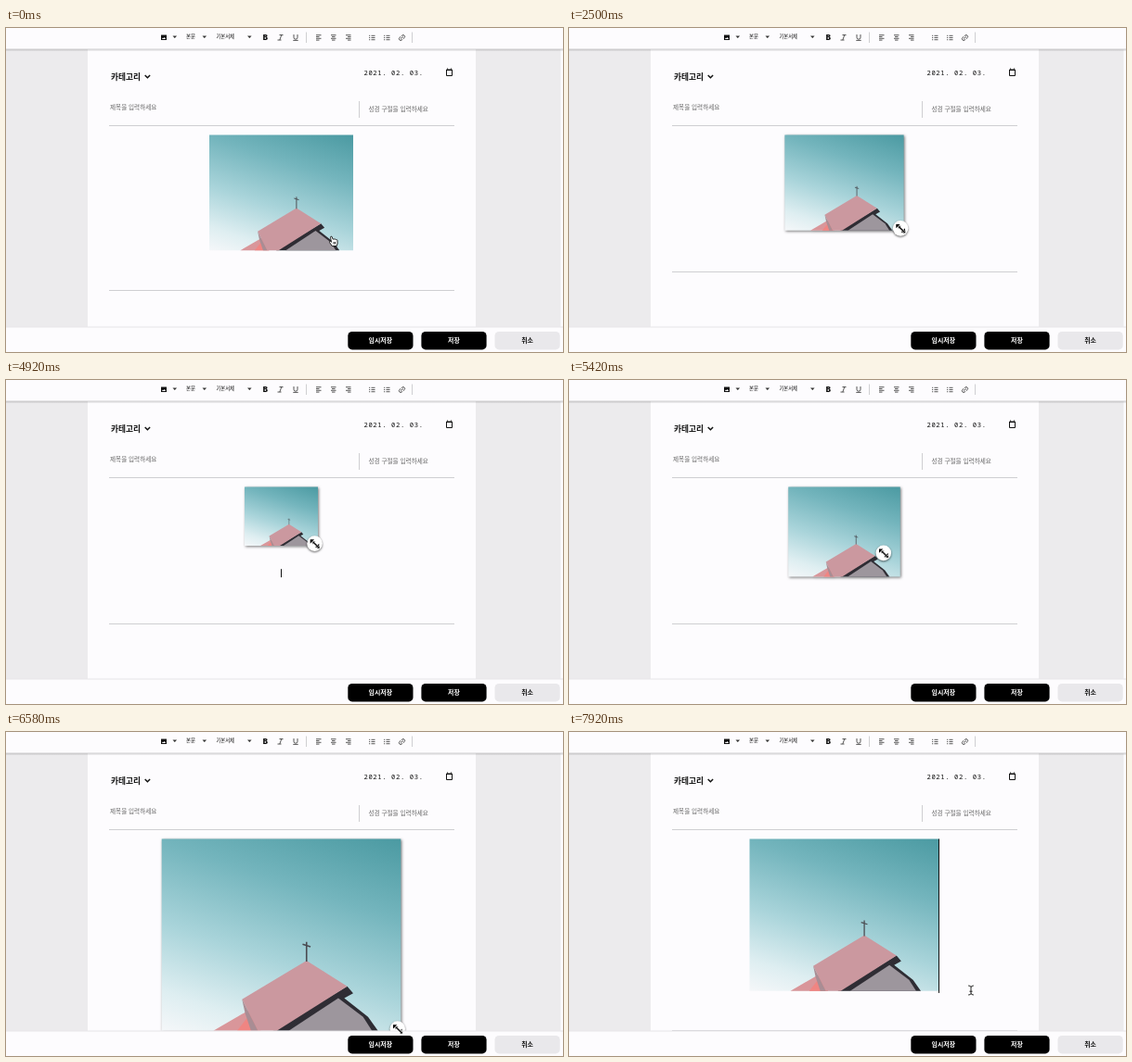
Write an HTML page that moves like this. It is 600x350 px and loops after 8 s.

```html
<!DOCTYPE html>
<html lang="ko">
<head>
<meta charset="utf-8">
<title>Image resize in an editor</title>
<style>
html, body { margin: 0; width: 100%; height: 100%; overflow: hidden; background: #fdfcfe; }
svg { display: block; width: 600px; height: 350px; }
text { font-family: "Noto Sans CJK KR", "Noto Sans CJK", "Noto Sans CJK JP", sans-serif; fill: #111; }
.hint { font-size: 6.6px; font-weight: 500; fill: #666; }
.date { font: 500 7.2px "Noto Sans Mono", monospace; letter-spacing: .62px; }
.btn { font-size: 6.9px; font-weight: 700; text-anchor: middle; }
.rule { stroke: #cfcfd2; fill: none; }
.icon { stroke: #444; stroke-width: .9; fill: none; }
.picked { filter: drop-shadow(1px 1.2px 1.6px #0008); }
#handle circle { filter: drop-shadow(.5px 1px 1.3px #0009); }
</style>
</head>
<body>
<svg viewBox="0 0 600 350">
  <defs>
    <linearGradient id="sky" gradientUnits="userSpaceOnUse" x1="241" y1="0" x2="160" y2="247">
      <stop offset="0" stop-color="#4b9aa2"/>
      <stop offset=".3" stop-color="#74b5bd"/>
      <stop offset=".6" stop-color="#a9d4da"/>
      <stop offset=".85" stop-color="#deeef1"/>
      <stop offset="1" stop-color="#f5f7f9"/>
    </linearGradient>
    <linearGradient id="bar" x2="0" y2="1">
      <stop stop-color="#0003"/><stop offset="1" stop-color="#0000"/>
    </linearGradient>
    <path id="ibeam" d="M-2.5-5Q0-5 0-3.500V3.500Q0 5-2.500 5M2.500-5Q0-5 0-3.500M2.500 5Q0 5 0 3.500M-1.200 1.200h2.400"/>
    <path id="arrow" d="M-4.800-4.300h4.300l-1.300 1.300L0-1.200V1L-3.200-1.600l-1.600 1.600z"/>
  </defs>

  <rect width="600" height="350" fill="#fdfcfe"/>
  <path d="M0 23H88V323H0zM506 23H597.5V323H506z" fill="#ecebed"/>

  <text x="113" y="55.8" font-size="8.7" font-weight="600">카테고리</text>
  <path d="M149.700 51l2.700 2.700 2.700-2.700" stroke="#111" stroke-width="1.5" fill="none"/>
  <text class="date" x="385.5" y="51.2">2021. 02. 03.</text>
  <path d="M474.500 45h6v6.500h-6zM474 45.500h7M475.500 43.500v1M479.500 43.500v1" stroke="#111" fill="none"/>
  <text class="hint" x="112" y="87.8">제목을 입력하세요</text>
  <text class="hint" x="390.5" y="90.2">성경 구절을 입력하세요</text>
  <path class="rule" d="M380.500 79V97M111 105.500H483"/>
  <path class="rule" id="rule" d="M111 0H483"/>

  <g id="photo">
    <g id="scene">
      <rect width="241" height="194" fill="url(#sky)"/>
      <path d="M88 173L52 194H100z" fill="#d9969a"/>
      <path d="M90 176L76 194H100z" fill="#f08582"/>
      <path d="M187 149L193 156L184 161L208 180L218 194H112z" fill="#2f2d34"/>
      <path d="M146 123L187 149L116 194H97L81 162z" fill="#cb989f"/>
      <path d="M81 162L97 194H90L84 176z" fill="#a98d94"/>
      <path d="M178 161L203 180L212 194H128z" fill="#9d969d"/>
      <path d="M146 104V124M142 106.500L150 109" stroke="#4a4a50" stroke-width="1.5"/>
    </g>
  </g>
  <path id="caret" stroke="#111"/>
  <g id="handle">
    <circle r="8.3" fill="#fff"/>
    <use href="#arrow"/><use href="#arrow" transform="rotate(180)"/>
  </g>

  <rect width="600" height="23" fill="#fdfcfe"/>
  <rect y="22.5" width="600" height="3" fill="url(#bar)"/>
  <path d="M167 7.500h6v5.500h-6zM168 12h4l-1.400-2-1 1.200-.7-.7z" fill="#111" fill-rule="evenodd"/>
  <path d="M179.500 8.500h4.600l-2.300 2.400zM211.500 8.500h4.600l-2.300 2.400zM260 8.500h4.600l-2.300 2.400z" fill="#333"/>
  <text x="194" y="11.2" font-size="5.5">본문</text>
  <text x="226.5" y="11.2" font-size="5.3">기본서체</text>
  <text x="276.8" y="13" font-size="7.8" font-weight="900" style="font-family:Inter,sans-serif">B</text>
  <path class="icon" d="M294.500 7.500h4M292.500 13h4M296.800 7.500l-2 5.500M310 7v3.200a2 2 0 0 0 4 0V7M309.300 13.400h5.400"/>
  <path class="rule" d="M323.500 4.500V16M437.500 4.500V16"/>
  <path class="icon" id="lines"/>
  <g class="icon" transform="rotate(-40 426.5 10.5)">
    <path d="M426 8.800h-1.300a1.700 1.700 0 0 0 0 3.400h1.300M427 8.800h1.300a1.700 1.700 0 0 1 0 3.400h-1.300M425 10.500h3"/>
  </g>

  <rect y="323" width="600" height="27" fill="#fdfcfe"/>
  <path d="M0 323H600" stroke="#e6e5e8"/>
  <g id="buttons"></g>

  <g id="beam" fill="none" stroke-linecap="round">
    <use href="#ibeam" stroke="#fff" stroke-width="2"/>
    <use href="#ibeam" stroke="#111" stroke-width=".9"/>
  </g>
  <path id="hand" d="M-1.800 5.500L-4.500 1.500q-.5-1.200.8-1.200l1.200 1L-3.500-3.800q.1-1.400 1.400-1L-.8-1.800q1-.8 1.700.1 1-.6 1.600.3 1.300-.3 1.500 1L4 3 3.200 5.500zM0 1v2.500M1.600 1v2.500" fill="#fff" stroke="#111" stroke-width=".9"/>
  <path id="resize" d="M-4-4h3.500L-1.600-2.900 2.900 1.600 4 .5V4H.5L1.600 2.900-2.900-1.600-4-.5z" fill="#111" stroke="#fff" stroke-width=".6"/>
</svg>
<script>
const $ = id => document.getElementById(id);
const LOOP = 8000, STEP = 1000 / 12, MID = 296.5, TOP = 115.5, RATIO = .806;

// Where the pointer turns: [step, x, y].
const stops = [[0, 353, 230], [4, 500, 319], [9, 352, 222], [18, 355, 203],
  [23, 370, 236], [37, 336, 208], [44, 327, 158], [51, 506, 319],
  [56, 333, 172], [73, 422, 308], [95, 433, 279]];

const ease = (s, from, to) => {
  const p = Math.min(1, Math.max(0, (s - from) / (to - from)));
  return p * p * (3 - 2 * p);
};
const during = (s, from, to) => s >= from && s <= to;

// Three drags: smaller, much larger, a little smaller again.
const width = (s, lag = 0) => 155 - 76 * ease(s, 26, 36)
  + 179 * ease(s - lag, 60, 76) - 54 * ease(s, 78.5, 88);

// Summing eased legs gives a path through all the stops.
const path = (s, axis) => stops.reduce((sum, stop, i) => {
  const last = stops[i - 1];
  return last ? sum + (stop[axis] - last[axis]) * ease(s, last[0], stop[0]) : stop[axis];
}, 0);

function place(id, x, y, shown = true) {
  $(id).setAttribute("transform", `translate(${x} ${y})`);
  $(id).style.display = shown ? "" : "none";
}

function draw(now) {
  const s = Math.floor((now % LOOP + 4) / STEP) % 96;
  const w = width(s), grip = width(s, 2.4), x = path(s, 1), y = path(s, 2);
  const left = MID - w / 2, right = MID + w / 2, bottom = TOP + w * RATIO;
  const gripX = MID + grip / 2 - 3.5, gripY = TOP + grip * RATIO - 2.5;
  const picked = during(s, 11, 45) || during(s, 55, 87);
  const onGrip = during(s, 23, 36) || during(s, 57, 71) || during(s, 76, 87);
  const onPhoto = x > left && x < right && y > TOP && y < bottom;
  const hand = onPhoto && !picked;

  $("scene").setAttribute("transform", `translate(${left} ${TOP}) scale(${w / 241})`);
  $("photo").setAttribute("class", picked ? "picked" : "");
  place("rule", 0, Math.round(Math.max(263, bottom + 42.5)) + .5);
  place("handle", gripX, gripY, picked);

  const blink = picked && (s + 4) % 12 < 6;
  const beside = s > 88;
  $("caret").setAttribute("d", beside ? `M${right} ${TOP}V${bottom + 2}`
    : `M${MID} ${bottom + 25}v9`);
  $("caret").style.display = blink || beside ? "" : "none";

  place("resize", gripX + 1.5, gripY + 1.5, onGrip);
  place("hand", x, y, hand);
  place("beam", x, y, !onGrip && !hand);
}

// Alignment and list icons are stacks of short lines.
const stack = (rows, line) => Array.from({ length: rows }, (_, i) => line(i)).join("");
$("lines").setAttribute("d",
  stack(3, k => stack(4, i => {
    const len = i % 2 ? 3.5 : 5.5;
    return `M${334 + 16 * k + (5.5 - len) * k / 2} ${7.7 + i * 1.8}h${len}`;
  })) +
  stack(2, k => stack(3, i =>
    `M${391 + 16 * k} ${8.3 + i * 2.2}h1.200m1.300 0h4`)));

$("buttons").innerHTML = ["임시저장", "저장", "취소"].map((label, i) => {
  const x = 368.3 + i * 79.1, [fill, ink] = i < 2 ? ["#000", "#fff"] : ["#e9e8eb", "#111"];
  return `<rect x="${x}" y="328" width="70.2" height="19.4" rx="4.5" fill="${fill}"/>
    <text class="btn" x="${x + 35}" y="339.8" style="fill:${ink}">${label}</text>`;
}).join("");

const start = performance.now();
(function tick() {
  draw(performance.now() - start);
  requestAnimationFrame(tick);
})();
</script>
</body>
</html>
```
